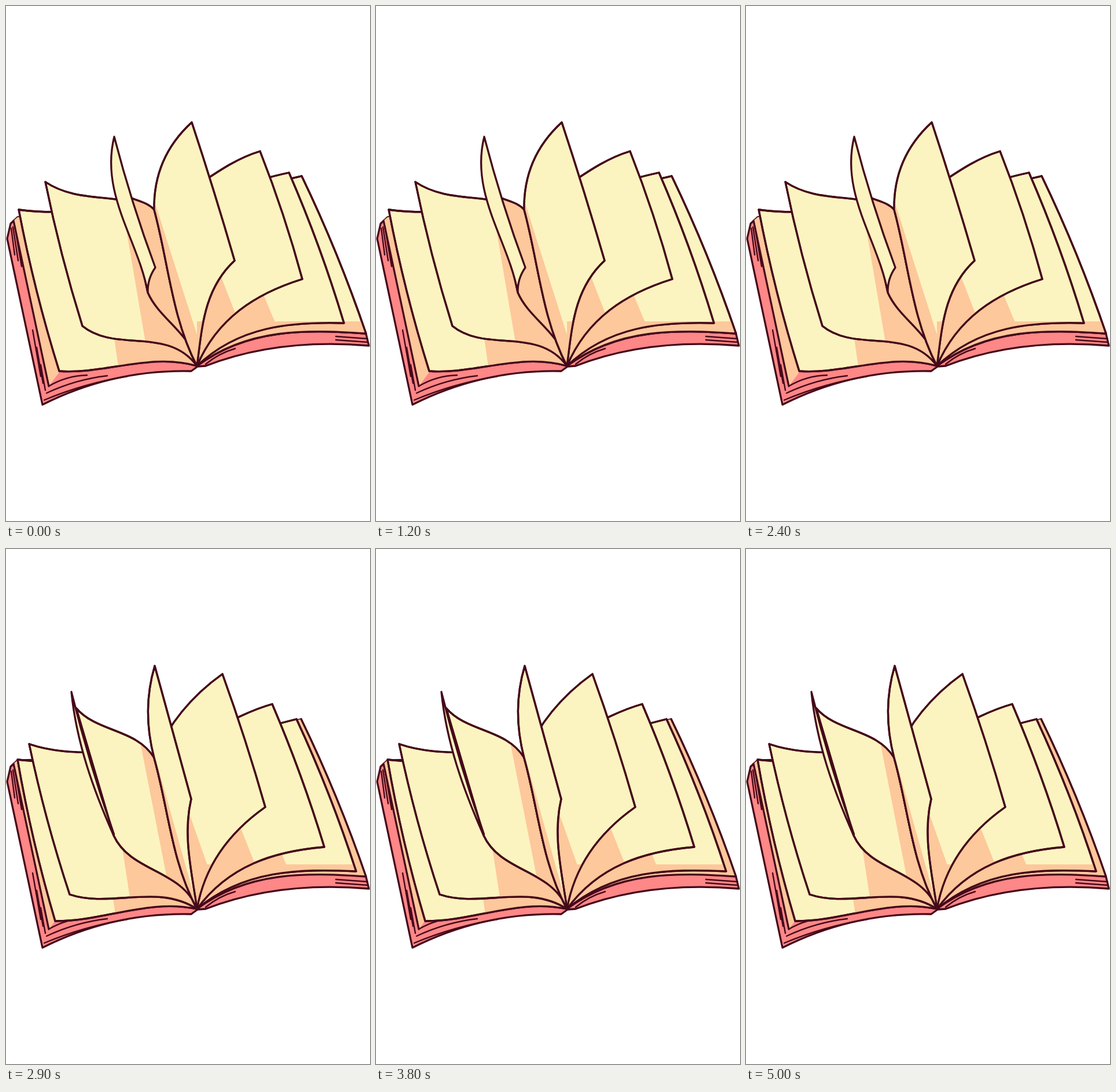
Animation, 629 px wide and 890 px high, one loop 5110 ms. Source, as an HTML page with a canvas:

```html
<!DOCTYPE html>
<html lang="en">
<head>
<meta charset="utf-8">
<title>Turning pages</title>
<style>
  html, body { margin: 0; width: 100%; height: 100%; overflow: hidden; background: #fff; }
  canvas { display: block; }
</style>
</head>
<body>
<canvas id="stage" width="629" height="890"></canvas>
<script>
const ctx = document.getElementById("stage").getContext("2d");
const CREAM = "#fcf4c0", ORANGE = "#fdc89b", PINK = "#fe8787", INK = "#45091a";
const LOOP = 5110, STEP = 100, LEAVES = 7;
const ROOT = [330, 622];

// Way of the tip and the lower corner of a leaf, from flat right to flat left.
const tips = [[511, 294], [502, 294], [489, 288], [460, 268], [439, 251], [374, 216], [321, 201],
  [257, 202], [187, 226], [113, 247], [68, 304], [40, 337], [22, 352], [20, 364]];
const corners = [[622, 566], [605, 557], [584, 548], [550, 515], [512, 472], [448, 446], [395, 440],
  [320, 432], [245, 495], [186, 495], [132, 553], [110, 597], [92, 631], [85, 643]];

// Edge bows at evenly spaced swings from -1 (left) to 1 (right).
const topBows = [[0, -14, -30, -5, 14, 25, 17, -12, 0], [4, 24, 14, 0, 15, 25, 16, 15, 0]];
const bottomBows = [[0, -25, -30, -8, -18, -34, -26, -33, -26], [14, 50, 30, 24, -5, -13, -34, -42, -48]];

const mix = (a, b, t) => a + (b - a) * t;
const between = (p, q, t) => [mix(p[0], q[0], t), mix(p[1], q[1], t)];
const clamp = x => Math.max(0, Math.min(1, x));

function bowsAt(tracks, swing) {
  const at = clamp((swing + 1) / 2) * 8, i = Math.min(7, Math.floor(at));
  return tracks.map(keys => mix(keys[i], keys[i + 1], at - i));
}

// Control points of an edge that bulges to the left of its direction.
function controls(a, b, bow1, bow2) {
  const dx = b[0] - a[0], dy = b[1] - a[1], length = Math.hypot(dx, dy) || 1;
  return [[1 / 3, bow1], [2 / 3, bow2]].map(([t, bow]) =>
    [a[0] + dx * t + dy / length * bow, a[1] + dy * t - dx / length * bow]);
}

function pointOn(a, b, bows, t) {
  const [c, d] = controls(a, b, ...bows);
  const [p, q, r] = [between(a, c, t), between(c, d, t), between(d, b, t)];
  return between(between(p, q, t), between(q, r, t), t);
}

// Each edge is [end point, bow, bow].
function outline(start, ...edges) {
  const path = new Path2D();
  path.moveTo(...start);
  let from = start;
  for (const [to, bow1 = 0, bow2 = bow1] of edges) {
    path.bezierCurveTo(...controls(from, to, bow1, bow2).flat(), ...to);
    from = to;
  }
  return path;
}

function paint(path, fill, width = 3.3) {
  if (fill) {
    ctx.fillStyle = fill;
    ctx.fill(path);
  }
  ctx.lineWidth = width;
  ctx.stroke(path);
}

function drawCover(top) {
  paint(outline([20, 365], [[8, 376]], [[2, 402]], [[63, 689]], [[320, 631], 22], [[331, 623]],
    [[345, 622]], [[627, 587], 24, 20], [[622, 566]], [[510, 294], -6], [top], [[20, 365]]), PINK);
  ctx.fillStyle = ORANGE;
  ctx.fill(outline(top, [[20, 365]], [[13, 371]], [[74, 657]], [[92, 633]], [ROOT, 0, 24]));
  paint(outline([13, 371], [[74, 657]]));
  paint(outline([510, 294], [[622, 566], 6], [ROOT, -26, -48], [top]), ORANGE);
  const hatch = (from, to, bow) => paint(outline(from, [to, bow]), null, 2.4);
  for (let k = 0; k < 3; k++) {
    hatch([9 + 3 * k, 384 - 2 * k], [15 + 6 * k, 430 + 10 * k]);
    hatch([46 + 7 * k, 560 + 30 * k], [60 + 4 * k, 640 + 12 * k]);
    hatch([74 - 4 * k, 657 + 12 * k], [140 + 35 * k, 638 + k], 6);
    if (k) hatch([570, 565 + 6 * k], [625, 569 + 6 * k]);
  }
  hatch([345, 619], [396, 592], 4);
}

function drawLeaf({ tip, corner, swing }, top) {
  const curl = swing < -0.2 ? clamp((swing + 0.57) * 3.3) : 0;
  const topEnd = curl ? between(tip, corner, 0.1 + 0.28 * curl) : tip;
  const bottom = bowsAt(bottomBows, swing);
  const body = outline(top, [topEnd, ...bowsAt(topBows, swing)], [corner, curl ? 0 : 6 * swing],
    [ROOT, ...bottom], [top, 20, 0]);
  paint(body, CREAM);

  // Shade between the spine and a line running roughly along it.
  const [x, y] = pointOn(corner, ROOT, bottom, (0.95 - 0.57 * Math.abs(swing)) * (1 - curl));
  const slope = 0.28 + 0.15 * swing, side = swing < -0.2 ? 629 : 0;
  ctx.save();
  ctx.clip(body);
  ctx.fillStyle = ORANGE;
  ctx.fill(outline([x - 400 * slope, y - 400], [[x + 100 * slope, y + 100]], [[side, y + 100]], [[side, y - 400]]));
  if (!side) ctx.fillRect(330, 545, 299, 60);
  ctx.restore();
  paint(body);

  if (curl) {
    const free = [corner[0] + 13 * curl, corner[1] - 43 * curl];
    paint(outline(tip, [corner, -15 - 30 * curl, 15 * curl - 12], [free, 5 * curl], [tip, 4]), CREAM);
  }
}

function drawBook(amount) {
  const top = [256, 352 + 9 * amount];
  ctx.clearRect(0, 0, 629, 890);
  ctx.strokeStyle = INK;
  ctx.lineCap = ctx.lineJoin = "round";
  drawCover(top);
  const leaves = Array.from({ length: LEAVES }, (_, n) => {
    const [tip, corner] = [tips, corners].map(way => between(way[2 * n], way[2 * n + 1], amount));
    return { tip, corner, swing: (tip[0] - 255) / 255 };
  });
  leaves.sort((a, b) => Math.abs(b.swing) - Math.abs(a.swing));
  for (const leaf of leaves) drawLeaf(leaf, top);
}

let shown = -1;
function tick(now) {
  const step = Math.min(50, Math.floor(now % LOOP / STEP));
  const pose = step % 3;
  if (pose !== shown) drawBook((shown = pose) / 2);
  requestAnimationFrame(tick);
}
tick(performance.now());
</script>
</body>
</html>
```
